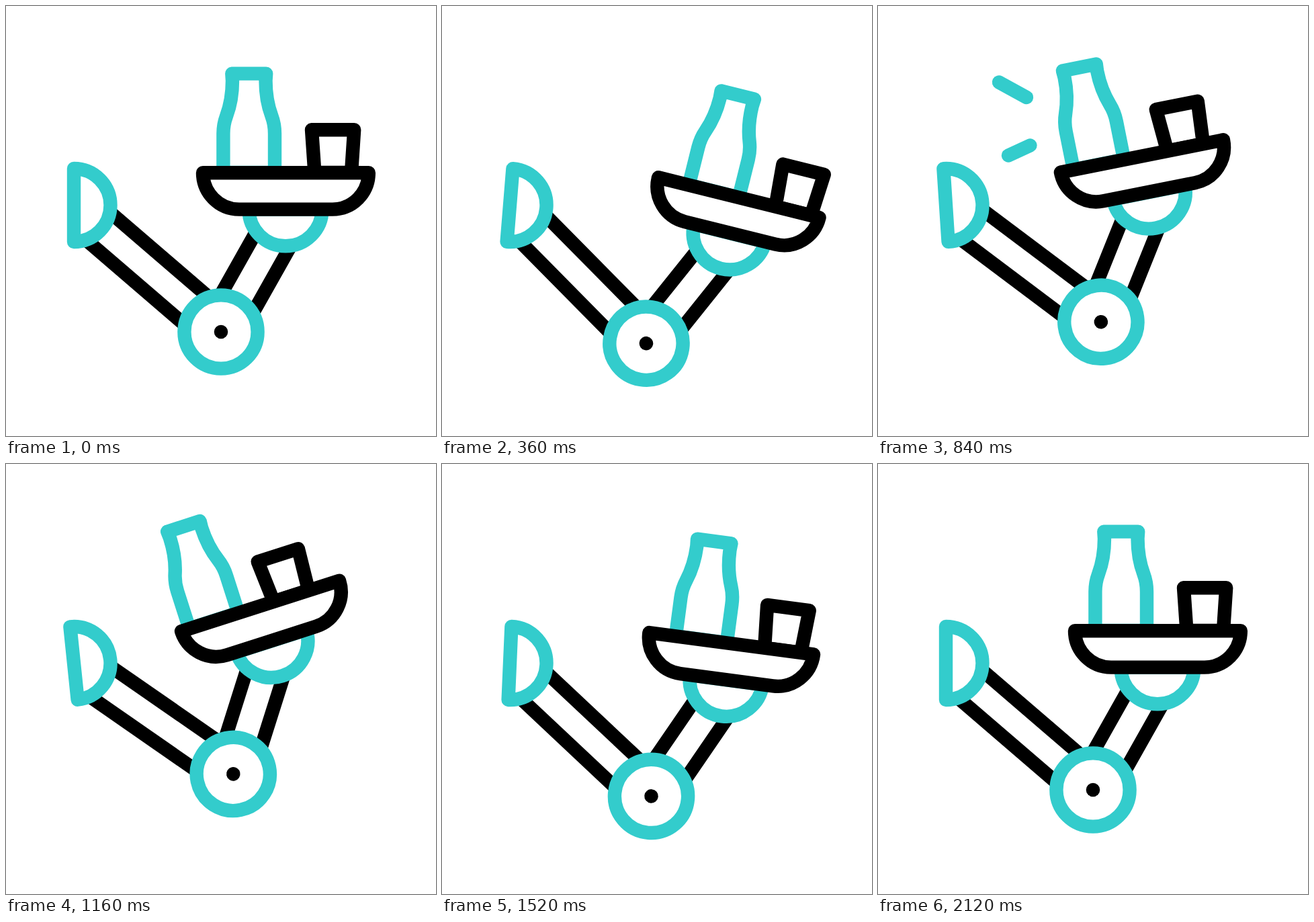
Write an HTML page that moves like this. It is 640x640 px and loops after 2.4 s.

```html
<!DOCTYPE html>
<html lang="en">
<head>
<meta charset="utf-8">
<title>Robot arm with tray</title>
<style>
  html, body { margin: 0; width: 100%; height: 100%; overflow: hidden; background: #fff; }
  svg { display: block; width: 100vw; height: 100vh; }
  path, circle { fill: #fff; stroke-width: 20.4; stroke-linecap: round; stroke-linejoin: round; }
  .teal { stroke: #3cc; }
  .black { stroke: #000; }
  .line { fill: none; }
</style>
</head>
<body>
<svg viewBox="0 0 640 640">
  <path id="rayTop" class="teal line"/>
  <path id="rayBottom" class="teal line"/>
  <g id="shoulder">
    <g transform="translate(101 296.5) rotate(40.7)">
      <path class="black line" d="M30 -27.2H270M30 27.2H270"/>
    </g>
    <path class="teal" d="M101 242V351A54.5 54.5 0 0 0 101 242Z"/>
    <g id="elbow">
      <g transform="translate(320 485) rotate(-60.6)">
        <path class="black line" d="M40 -27.5H170M40 27.5H170"/>
      </g>
      <g id="wrist">
        <path class="teal" d="M361.5 302.8H470.5A54.5 54.5 0 0 1 361.5 302.8Z"/>
        <path id="bottle" class="teal" d="M323.4 248V190C323.4 181 325 172 328 164C334 148 337 130 337 111L336.3 100.6H387.2L386.5 111C386.5 130 389.5 148 395.5 164C398.5 172 400 181 400 190V248Z"/>
        <path id="glass" class="black" d="M455 184.3H518.2L514 248H459.4Z"/>
        <path class="black" d="M293 248.2H539.8C539.8 278 516 302.6 486 302.6H347C317 302.6 293 278 293 248.2Z"/>
      </g>
      <circle class="teal" cx="320" cy="485" r="54.6"/>
      <circle cx="320" cy="485" r="10.3" style="fill:#000"/>
    </g>
  </g>
</svg>
<script>
const LOOP = 2400;
const el = id => document.getElementById(id);
const clamp = v => Math.min(1, Math.max(0, v));
const smooth = u => u * u * (3 - 2 * u);

// Cubic Bezier easing with level ends, solved by bisection.
function bezier(x1, x2) {
  return x => {
    let lo = 0, hi = 1;
    for (let i = 0; i < 24; i++) {
      const m = (lo + hi) / 2, n = 1 - m;
      if (3 * n * n * m * x1 + 3 * n * m * m * x2 + m * m * m < x) lo = m; else hi = m;
    }
    return smooth(lo);
  };
}
const settle = bezier(.25, .87);

// Keys are [time, value, easing towards this key].
function track(keys) {
  return t => {
    if (t <= keys[0][0]) return keys[0][1];
    for (let i = 1; i < keys.length; i++) {
      const [t0, v0] = keys[i - 1], [t1, v1, ease = smooth] = keys[i];
      if (t < t1) return v0 + (v1 - v0) * ease((t - t0) / (t1 - t0));
    }
    return keys[keys.length - 1][1];
  };
}

const swing = track([[0, 0], [520, 6], [1020, -7.8], [1560, 3, settle], [2080, 0]]);
const bottleSlide = track([[0, 0], [520, 21], [1020, -24], [1560, 11, settle], [2080, 0]]);
const glassSlide = track([[40, 0], [570, 20], [1080, -25], [1600, 11.5, settle], [2120, 0]]);

// A ray grows outwards, then its inner end follows.
function ray(id, t, x0, y0, x1, y1) {
  const head = smooth(clamp((t - 680) / 130)), tail = smooth(clamp((t - 860) / 110));
  const at = k => `${x0 + (x1 - x0) * k} ${y0 + (y1 - y0) * k}`;
  el(id).setAttribute("d", head > tail ? `M${at(tail)}L${at(head)}` : "");
}

const place = (id, value) => el(id).setAttribute("transform", value);

function draw(t) {
  const a = swing(t);
  place("shoulder", `rotate(${a} 101 296.5)`);
  place("elbow", `rotate(${a} 320 485)`);
  place("wrist", `rotate(${a} 416 303)`);
  place("bottle", `translate(${bottleSlide(t)} 0)`);
  place("glass", `translate(${glassSlide(t)} 0)`);
  ray("rayTop", t, 221, 136, 180, 113.5);
  ray("rayBottom", t, 226.5, 207.5, 194, 222.5);
}

const start = performance.now();
function tick() {
  draw((performance.now() - start) % LOOP);
  requestAnimationFrame(tick);
}
tick();
</script>
</body>
</html>
```
